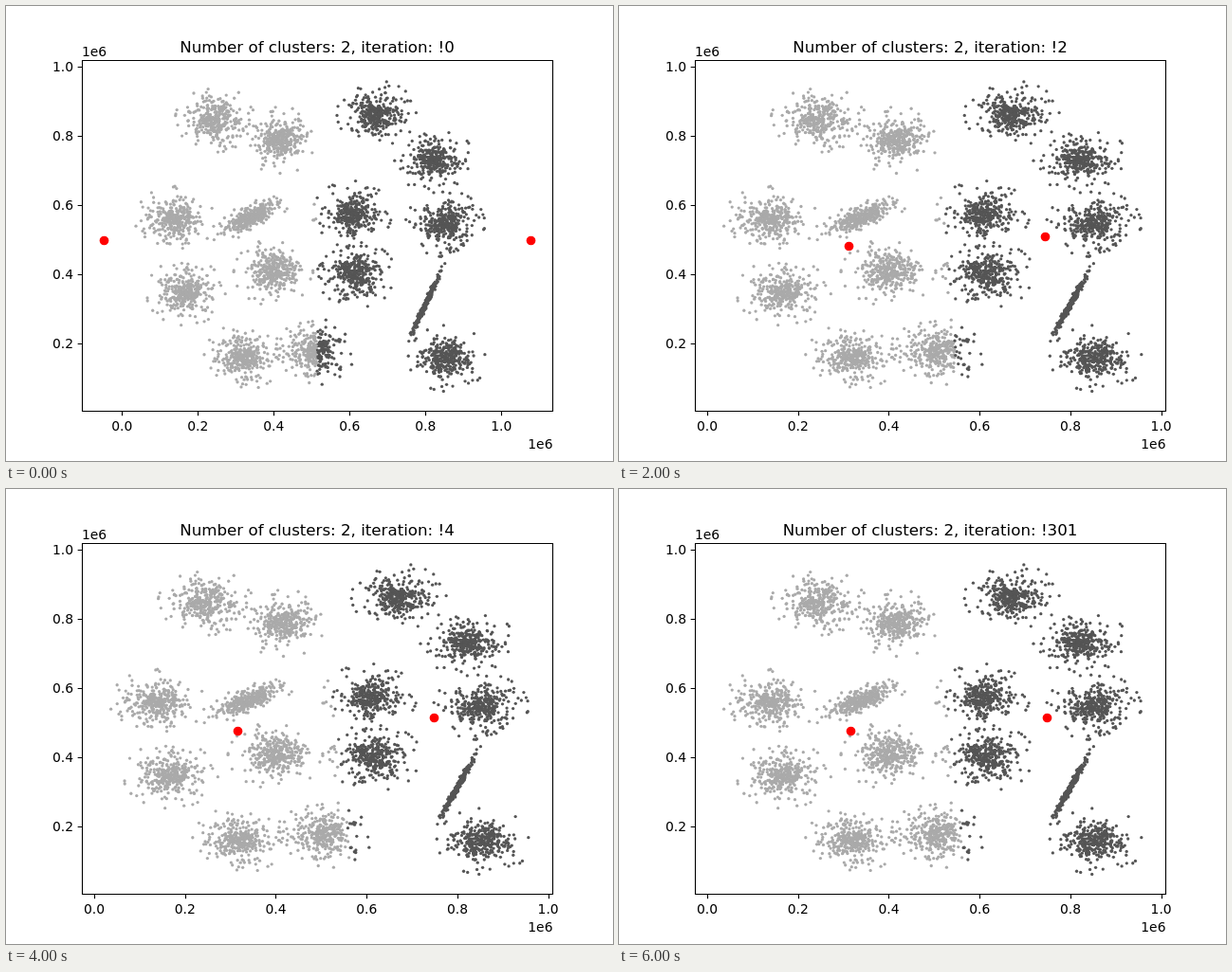
An HTML page with a canvas that plays this animation: 640 px wide and 480 px high, repeating every 7 s.

```html
<!DOCTYPE html>
<html lang="en">
<head>
<meta charset="utf-8">
<title>Clusters</title>
<style>
  html, body { margin: 0; width: 100%; height: 100%; overflow: hidden; background: #fff; }
  canvas, svg { position: absolute; left: 0; top: 0; width: 640px; height: 480px; }
  svg { font: 13.89px "DejaVu Sans", sans-serif; }
  path { fill: none; stroke: #000; stroke-width: 1.11; }
  #title { font-size: 16.67px; }
</style>
</head>
<body>
<canvas id="plot" width="640" height="480"></canvas>
<svg viewBox="0 0 640 480">
  <path d="M80.5 57.5H576.5V427.5H80.5Z"/>
  <path id="ticks"/>
  <text id="title" x="328" y="49" text-anchor="middle"></text>
  <text x="80" y="53">1e6</text>
  <text x="576.5" y="467" text-anchor="end">1e6</text>
  <g id="xLabels" text-anchor="middle"></g>
  <g id="yLabels" text-anchor="end"></g>
</svg>
<script>
const $ = id => document.getElementById(id);
const ctx = $('plot').getContext('2d');

// cluster means, round unless a shape follows: spread x, spread y, correlation
const clusters = [
  [.245, .848], [.418, .787], [.671, .863], [.823, .731], [.139, .558],
  [.337, .562, .036, .023, .7], [.606, .574], [.852, .546], [.168, .348],
  [.399, .405], [.618, .399], [.802, .318, .017, .04, .988],
  [.321, .162], [.509, .176], [.859, .157]
];

let seed = 7;
function rand() {
  seed = (seed + 0x6D2B79F5) | 0;
  let t = Math.imul(seed ^ seed >>> 15, 1 | seed);
  t = t + Math.imul(t ^ t >>> 7, 61 | t) ^ t;
  return ((t ^ t >>> 14) >>> 0) / 4294967296;
}

// bell-shaped cloud with a dense core
function sample([mx, my, sx = .036, sy = .033, c = 0]) {
  const r = Math.min(2.9, Math.sqrt(-2 * Math.log(1 - rand())) * (.45 + .95 * rand()));
  const a = rand() * 2 * Math.PI;
  const u = r * Math.cos(a), v = r * Math.sin(a);
  return [mx + sx * u, my + sy * (c * u + Math.sqrt(1 - c * c) * v)];
}

const points = clusters.flatMap(c => Array.from({ length: 333 }, () => sample(c)));

// centres start outside the data, jump in, then settle geometrically
function centresAt(step) {
  if (!step) return [[-.0494, .497], [1.0779, .497]];
  const k = (1 - .6 ** Math.min(step - 1, 3)) / (1 - .6 ** 3);
  return [[.307 + .0085 * k, .49 - .0135 * k], [.7375 + .0105 * k, .501 + .014 * k]];
}

const toY = y => 429.08 - 365.36 * y;
const dist = (p, q) => (p[0] - q[0]) ** 2 + (p[1] - q[1]) ** 2;
const snap = v => Math.round(v) + .5;

function dot(x, y, r, color) {
  ctx.fillStyle = color;
  ctx.beginPath();
  ctx.arc(x, y, r, 0, 2 * Math.PI);
  ctx.fill();
}

function drawAxes(toX) {
  let ticks = '', xs = '', ys = '';
  for (let i = 0; i <= 5; i++) {
    const v = i / 5, x = toX(v), y = toY(v), label = v.toFixed(1);
    ticks += `M${snap(x)} 427.5v4.86`;
    xs += `<text x="${x}" y="448">${label}</text>`;
    if (!i) continue;
    ticks += `M80.5 ${snap(y)}h-4.86`;
    ys += `<text x="71" y="${Math.round(y + 5)}">${label}</text>`;
  }
  $('ticks').setAttribute('d', ticks);
  $('xLabels').innerHTML = xs;
  $('yLabels').innerHTML = ys;
}

function draw(step) {
  const [left, right] = centresAt(step);
  const toX = step ? x => 93.05 + 478.6 * x : x => 122.3 + 400 * x;
  ctx.clearRect(0, 0, 640, 480);
  for (const p of points) {
    dot(toX(p[0]), toY(p[1]), 1.65, dist(p, left) < dist(p, right) ? '#aaa' : '#555');
  }
  for (const [x, y] of [left, right]) dot(snap(toX(x)), snap(toY(y)), 4.86, '#f00');
  drawAxes(toX);
  $('title').textContent = `Number of clusters: 2, iteration: !${step < 6 ? step : 301}`;
}

let shown = -1;
function tick() {
  const step = Math.floor(performance.now() % 7000 / 1000);
  if (step !== shown) draw(shown = step);
  requestAnimationFrame(tick);
}
tick();
</script>
</body>
</html>
```
